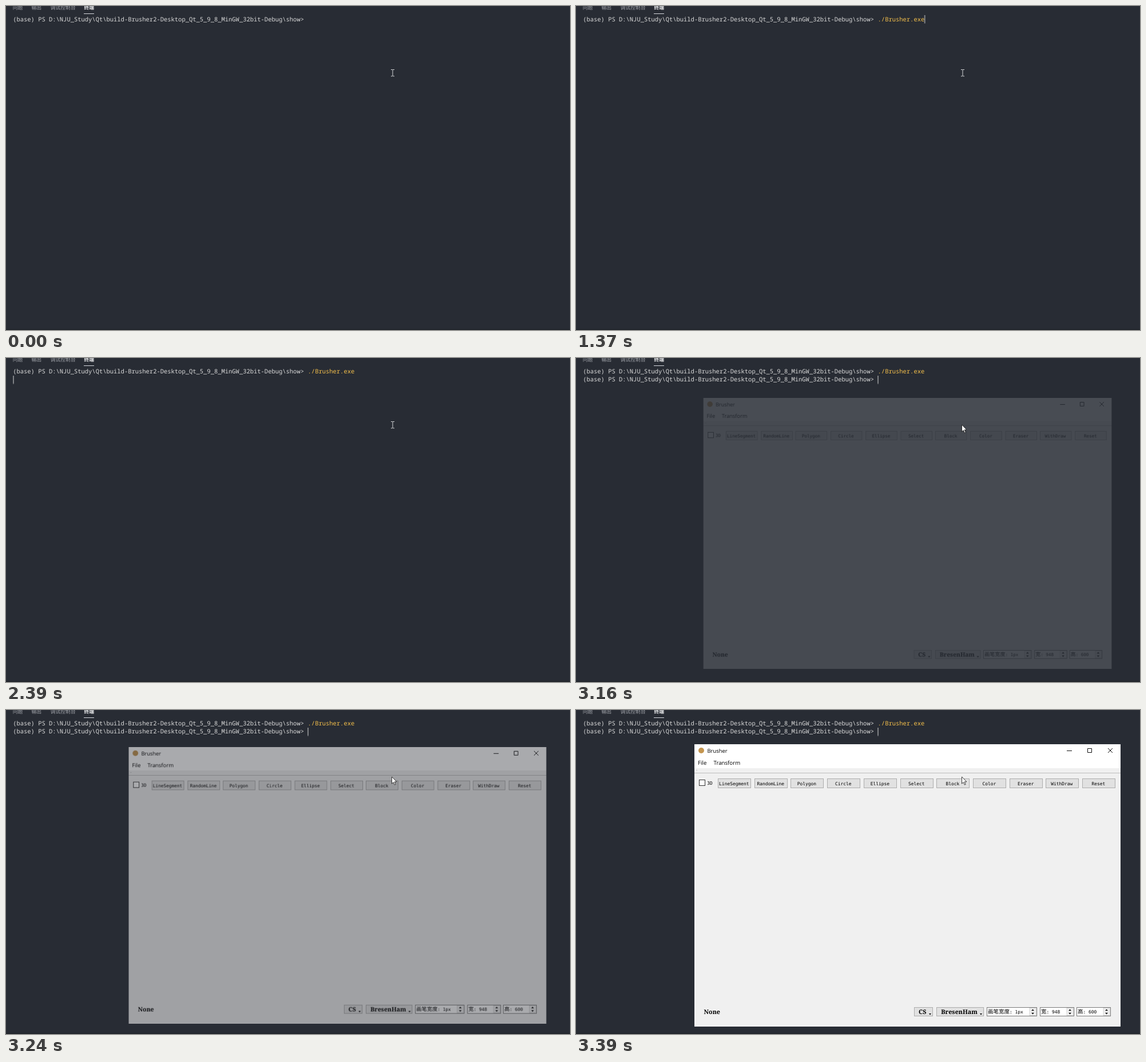
An HTML page that plays this animation: 986 px wide and 568 px high, repeating every 5730 ms.

```html
<!DOCTYPE html>
<html lang="zh">
<head>
<meta charset="utf-8">
<title>Terminal launch</title>
<style>
html, body { margin: 0; width: 100%; height: 100%; overflow: hidden; background: #282c34; }
svg { display: block; text-rendering: geometricPrecision; }
.tab { font: 8.8px "Noto Sans CJK SC", "Noto Sans CJK", sans-serif; fill: #a4a7ad; }
.tab.on { fill: #f0f1f3; font-weight: 700; }
.term { font: 10.475px "Noto Sans Mono", monospace; fill: #dadada; }
.cmd { fill: #f5c04c; }
.ui { font-family: "Open Sans", sans-serif; font-size: 9.7px; }
.small { font: 7.92px "DejaVu Sans Mono", monospace; }
.cjk { font: 9.5px "Noto Sans CJK SC", "Noto Sans CJK", sans-serif; }
.bold { font: bold 10.8px "Noto Serif", serif; }
.mid { text-anchor: middle; }
.line { fill: none; stroke: #111; }
.btn { fill: #e1e1e1; stroke: #adadad; }
.field { fill: #fff; stroke: #7a7a7a; }

.caret, .typed, .full, .next, .beam, .arrow, .win {
  animation: 5730ms step-end infinite;
}
.caret { animation-name: caret; }
.typed { animation-name: typed; }
.full { animation-name: full; }
.next { animation-name: next; }
.beam { animation-name: beam; }
.arrow { animation-name: arrow; }
.win { animation-name: open; transform-origin: 579.3px 307px; }

@keyframes caret {
  0% { opacity: 0; transform: none; }
  7.853% { opacity: 1; transform: none; }
  18.499% { opacity: 1; transform: translate(31.4px, 0); }
  23.909% { opacity: 1; transform: translate(81.7px, 0); }
  34.904% { opacity: 0; transform: translate(81.7px, 0); }
  41.71% { opacity: 1; transform: translate(-515px, 14.5px); }
  42.931% { opacity: 1; transform: translate(0, 14.5px); }
  52.53% { opacity: 0; transform: translate(0, 14.5px); }
  55.148%, 100% { opacity: 1; transform: translate(0, 14.5px); }
}
@keyframes typed { 0% { opacity: 0; } 18.499% { opacity: 1; } 23.909%, 100% { opacity: 0; } }
@keyframes full { 0% { opacity: 0; } 23.909%, 100% { opacity: 1; } }
@keyframes next { 0% { opacity: 0; } 42.931%, 100% { opacity: 1; } }
@keyframes beam { 0% { opacity: 1; } 55.148%, 100% { opacity: 0; } }
@keyframes arrow { 0% { opacity: 0; } 55.148%, 100% { opacity: 1; } }
@keyframes open {
  0% { opacity: 0; transform: scale(.958); }
  55.148% { opacity: .155; transform: scale(.958); }
  56.544% { opacity: .6; transform: scale(.98); }
  57.94% { opacity: .855; transform: scale(.9925); }
  59.162%, 100% { opacity: 1; transform: none; }
}
</style>
</head>
<body>
<svg width="986" height="568" viewBox="0 0 986 568">
  <rect width="986" height="568" fill="#282c34"/>
  <rect y="566" width="986" height="2" fill="#21252b"/>

  <g class="tab">
    <text x="11.8" y="6.3">问题</text>
    <text x="44.5" y="6.3">输出</text>
    <text x="77.7" y="6.3">调试控制台</text>
    <text class="tab on" x="136.5" y="6.3">终端</text>
  </g>
  <rect x="136" y="13" width="18" height="1" fill="#d7dae0"/>

  <g class="term">
    <text x="12.2" y="26.5">(base) PS D:\NJU_Study\Qt\build-Brusher2-Desktop_Qt_5_9_8_MinGW_32bit-Debug\show&gt;</text>
    <text class="cmd typed" x="527.6" y="26.5">brush</text>
    <text class="cmd full" x="527.6" y="26.5">./Brusher.exe</text>
    <text class="next" x="12.2" y="40.8">(base) PS D:\NJU_Study\Qt\build-Brusher2-Desktop_Qt_5_9_8_MinGW_32bit-Debug\show&gt;</text>
  </g>
  <rect class="caret" x="527.5" y="16" width="1" height="14.5" fill="#dadada"/>

  <g class="win">
    <rect x="207" y="60" width="745" height="495" fill="#f0f0f0"/>
    <rect x="207" y="60" width="745" height="42" fill="#fff"/>
    <circle cx="219" cy="71" r="5" fill="#c4954f"/>
    <g class="ui">
      <text x="229.5" y="74.8" font-size="9.4">Brusher</text>
      <text x="213" y="96">File</text>
      <text x="240.5" y="96">Transform</text>
    </g>
    <path class="line" d="M858 71.5h9M894.5 67.5h7v7h-7zM930 67l8 8M938 67l-8 8"/>
    <path d="M207 110.5h745" stroke="#bdbdbd"/>
    <rect x="210.5" y="105" width="1" height="1" fill="#999"/>

    <rect x="215.5" y="122.5" width="10" height="10" fill="#fff" stroke="#333"/>
    <text class="small" x="229.3" y="131.4">3D</text>
    <g id="tools"></g>

    <text class="bold" x="223.5" y="533.4">None</text>
    <rect class="btn" x="591.5" y="521.5" width="32" height="15"/>
    <text class="bold" x="599" y="533.4">CS</text>
    <rect class="btn" x="630.5" y="521.5" width="82" height="15"/>
    <text class="bold" x="638.3" y="533.4">BresenHam</text>
    <path d="M617 532h4l-2 2.4zM706 532h4l-2 2.4z"/>
    <g id="spins"></g>
  </g>

  <path class="beam" d="M673 111.5h2.5l.5 .5 .5-.5h2.5M676 112v10.5M673 123h2.5l.5-.5 .5 .5h2.5" fill="none" stroke="#d5d6d8"/>
  <path class="arrow" d="M674.5 117v12.2l2.8-2.6 2 4.6 1.9-.8-2-4.5h3.8z" fill="#fff" stroke="#111" stroke-width=".8"/>
</svg>
<script>
const fill = (id, items, draw) =>
  document.getElementById(id).innerHTML = items.map(draw).join('');

const tools = ['LineSegment', 'RandomLine', 'Polygon', 'Circle', 'Ellipse', 'Select',
  'Block', 'Color', 'Eraser', 'WithDraw', 'Reset'];
fill('tools', tools, (name, i) => {
  const x = Math.round(248 + i * 63.7) + .5;
  return `<rect class="btn" x="${x}" y="120.5" width="57" height="16"/>
    <text class="small mid" x="${x + 27.8}" y="131.6">${name}</text>`;
});

const spins = [[718, 87, '画笔宽度', '1px'], [811, 59, '宽', '948'], [875, 59, '高', '600']];
fill('spins', spins, ([x, w, label, value]) => {
  const end = x + w, colon = x + 2 + label.length * 9.5;
  return `<rect class="field" x="${x + .5}" y="521.5" width="${w}" height="15"/>
    <rect x="${end - 12}" y="522.5" width="11" height="13" fill="#f0f0f0" stroke="#c4c4c4" stroke-width=".7"/>
    <path d="M${end - 9} 527.3h5l-2.5-2.8zM${end - 9} 530.8h5l-2.5 2.8z"/>
    <text class="cjk" x="${x + 2}" y="532.2">${label}</text>
    <text class="small" x="${colon}" y="531.8">:</text>
    <text class="small" x="${colon + 9.5}" y="531.8">${value}</text>`;
});
</script>
</body>
</html>
```
